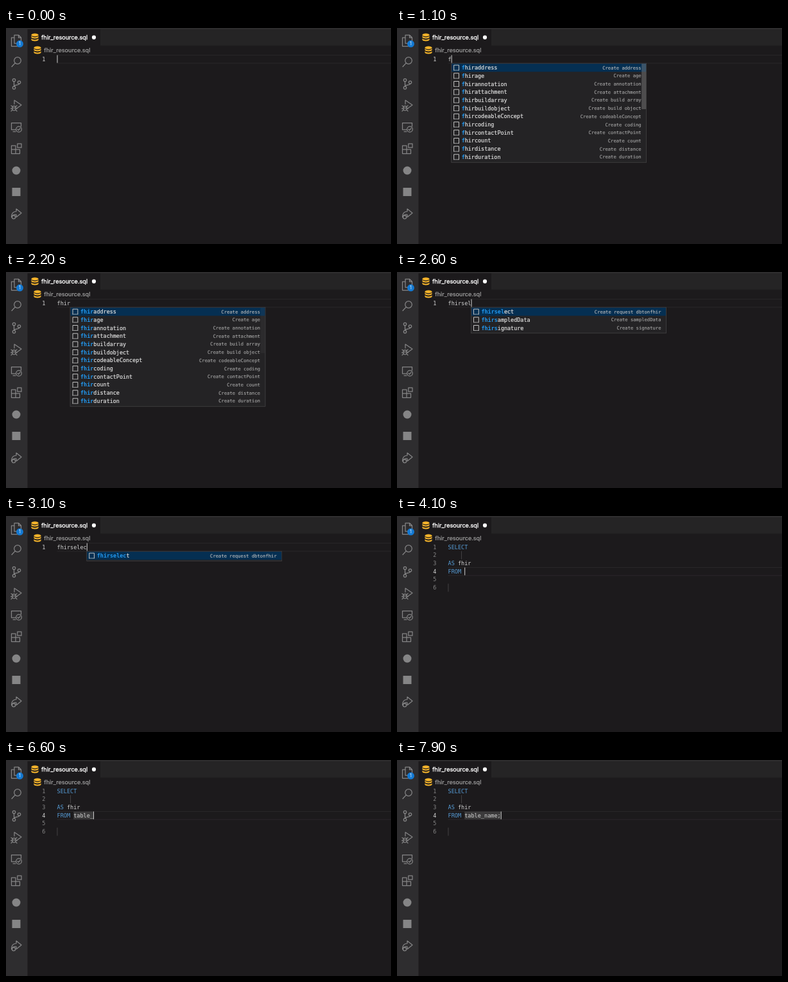
An HTML page that plays this animation: 600x338 px, repeating every 8 s.

```html
<!DOCTYPE html>
<html lang="en">
<head>
<meta charset="utf-8">
<title>SQL snippet typing</title>
<style>
html, body { margin: 0; width: 100%; height: 100%; overflow: hidden; background: #1c1a1c; }
svg { display: block; width: 600px; height: 338px; }
text { white-space: pre; }
.ui { font: 9.12px Inter, sans-serif; }
.code { font: 8.54px "DejaVu Sans Mono", monospace; fill: #d4d4d4; }
.item { font: 8.44px "DejaVu Sans Mono", monospace; fill: #e0e0e0; stroke: #e0e0e0; stroke-width: .2px; }
.note { font: 7.18px "DejaVu Sans Mono", monospace; fill: #a6a6a6; stroke: #a6a6a6; stroke-width: .12px; text-anchor: end; }
.hit { font-weight: bold; fill: #2197ee; stroke: none; }
.kw { fill: #569cd6; }
.num { text-anchor: end; }
.icons { fill: none; stroke: #858586; stroke-width: 1.25; stroke-linejoin: round; stroke-linecap: round; }
</style>
</head>
<body>
<svg viewBox="0 0 600 338">
  <defs>
    <g id="db" fill="#f3b32b">
      <ellipse cy="-3.6" rx="5.6" ry="2.4"/>
      <path id="disc" d="M-5.6-2.2C-4 .6 4 .6 5.6-2.2V-.2C5.6 2.8-5.6 2.8-5.6-.2Z"/>
      <use href="#disc" y="4"/>
    </g>
    <clipPath id="list"><rect x="0" y="55" width="600" height="155"/></clipPath>
  </defs>
  <rect width="600" height="338" fill="#1c1a1c"/>
  <rect width="600" height="27.5" fill="#252425"/>
  <rect width="600" height="2" fill="#2e2d2e"/>
  <rect x="33" y="2" width="114" height="26" fill="#1c1a1c"/>
  <rect width="33.5" height="338" fill="#2e2d2f"/>

  <g class="icons">
    <path d="M13 15V11H19.5L23.5 15V24H13ZM19.5 11V15H23.5M13 15H8.5V28.5H18.5V24"/>
    <circle cx="18" cy="51" r="5.3"/><path d="M14.2 54.8L9 60.5"/>
    <circle cx="12.5" cy="81.5" r="2.2"/><circle cx="12.5" cy="93.5" r="2.2"/>
    <circle cx="20.5" cy="85" r="2.2"/><path d="M12.5 83.7V91.3M20.5 87.2C20.5 90 14 88 12.5 91"/>
    <path d="M13 119V113L24 120.5L17 125.5"/>
    <ellipse cx="12.5" cy="125.5" rx="2.8" ry="3.5"/>
    <path d="M9.7 125H15.3M8 121.5L10.3 123M17 121.5L14.7 123M7.5 126H9.7M15.3 126H17.3M8 130L10.3 128M17 130L14.7 128"/>
    <path d="M15 159H8.5V148.5H23.5V154M11 162H15"/>
    <circle cx="20" cy="158.5" r="4.3"/><path d="M18 158.5L19.5 160L22 157"/>
    <path d="M8.5 184H15V196.5H8.5ZM8.5 190.2H21.5V196.5H15M17.8 181H24V187.2H17.8Z"/>
    <path d="M16 287V283L24 289.5L16 296V292C12 291.5 10 293 8.5 296C8.5 290 11.5 287.2 16 287Z"/>
    <circle cx="12" cy="296" r="2.6" fill="#2e2d2f"/>
  </g>
  <circle cx="16" cy="223" r="6.5" fill="#858586"/>
  <rect x="9.5" y="250" width="13" height="13" fill="#858586"/>
  <circle cx="21.5" cy="24.8" r="5.5" fill="#1479d2"/>
  <text class="ui" x="21.5" y="27.3" text-anchor="middle" fill="#fff" style="font-size:7px">1</text>

  <use href="#db" x="45" y="14.5"/>
  <text class="ui" x="55" y="17.6" fill="#fff" stroke="#fff" stroke-width=".3">fhir_resource.sql</text>
  <circle cx="137" cy="14.7" r="3.1" fill="#fff"/>
  <use href="#db" x="49" y="34.5"/>
  <text class="ui" x="59.3" y="37.8" fill="#a5a5a5" stroke="#a5a5a5" stroke-width=".2">fhir_resource.sql</text>
  <g id="editor"></g>
</svg>
<script>
const LOOP = 8000, LEFT = 79.5, CHAR = 5.14, ROW = 12.7, BLINK = 500;
const editor = document.getElementById('editor');

const all = ['address', 'age', 'annotation', 'attachment', 'build array', 'build object',
  'codeableConcept', 'coding', 'contactPoint', 'count', 'distance', 'duration', 'element']
  .map(s => ['fhir' + s.replace(' ', ''), 'Create ' + s]);
const one = [['fhirselect', 'Create request dbtonfhir']];
const few = [...one, ['fhirsampledData', 'Create sampledData'], ['fhirsignature', 'Create signature']];

// [time of key press, typed length, open list]
const word = 'fhirselect';
const keys = [[-300, 0], [1000, 1], [1300, 2, all], [1500, 3, all], [1700, 4, all],
  [2300, 5, few], [2450, 6, few], [2600, 7, few], [2800, 8, one], [3000, 9, one], [3250, 10, one]];
const EXPAND = 3700;
const table = 'table_name;';
const tableKeys = [4800, 5100, 5400, 5700, 6000, 6400, 6700, 6900, 7100, 7200, 7600];

const rect = (x, y, w, h, fill, more = '') =>
  `<rect x="${x}" y="${y}" width="${w}" height="${h}" fill="${fill}" ${more}/>`;
const text = (cls, x, y, s, more = '') => `<text class="${cls}" x="${x}" y="${y}" ${more}>${s}</text>`;
const lineTop = line => 42.3 + (line - 1) * ROW;
const baseline = line => lineTop(line) + 9.2;

const lineNumber = (line, active) =>
  text('code num', 61.5, baseline(line), line, `style="fill:${active ? '#d0d0d0' : '#858585'}"`);
const currentLine = line =>
  [0, ROW].map(d => rect(LEFT, lineTop(line) + d - .4, 521, .9, '#2b292b')).join('');
const caret = (x, line) => rect(x, lineTop(line) + .2, 1, ROW - .6, '#d0d0d0');
const guide = (x, line) => rect(x, lineTop(line), .9, ROW, '#484648');
const caretOn = (t, since) => Math.floor((t - since) / BLINK) % 2 === 0;

function shared(a, b) {
  let n = 0;
  while (n < a.length && a[n] === b[n]) n++;
  return n;
}

function popup(typed, rows, bar) {
  const x = LEFT + typed.length * CHAR, h = Math.min(155, rows.length * ROW + 2.3);
  let s = rect(x, 55.3, 304, h, '#242325', 'stroke="#434244" stroke-width=".8"');
  s += rect(x + .5, 55.8, 303, ROW, '#052f52');
  s += '<g clip-path="url(#list)">';
  rows.forEach(([name, note], i) => {
    const y = 55.8 + i * ROW, n = shared(name, typed);
    s += `<path d="M${x + 4} ${y + 10.3}V${y + 2.3}H${x + 11.8}V${y + 10.3}" fill="none" stroke="#c4c4c4"/>`;
    s += `<path d="M${x + 3.5} ${y + 10.3}H${x + 12.3}" stroke="#c4c4c4" stroke-dasharray="1.8 .5"/>`;
    s += text('item', x + 16, y + 9.3, `<tspan class="hit">${name.slice(0, n)}</tspan>${name.slice(n)}`);
    s += text('note', x + 296, y + 8.8, note, i ? '' : 'style="fill:#c4c4c4"');
  });
  s += '</g>';
  if (rows === all) s += rect(x + 296.5, 56, 7, 71, '#8c8c8c', `opacity="${bar ? .4 : .08}"`);
  return s;
}

function typing(t) {
  const [at, n, rows] = keys.filter(k => k[0] <= t).pop();
  const typed = word.slice(0, n);
  let s = currentLine(1) + lineNumber(1, true) + text('code', LEFT, baseline(1), typed);
  if (caretOn(t, at)) s += caret(LEFT + n * CHAR, 1);
  // The list opens a moment after the first key
  const open = rows || (t >= 1100 && all);
  return open ? s + popup(typed, open, t < 1700) : s;
}

function snippet(t) {
  const done = tableKeys.filter(k => k <= t), n = done.length, x = LEFT + 5 * CHAR;
  let s = currentLine(4);
  for (let i = 1; i <= 6; i++) s += lineNumber(i, i === 4);
  s += guide(100, 2) + guide(LEFT, 6);
  if (n) s += rect(x, lineTop(4) + .3, n * CHAR, ROW - .6, '#3b3a3b');
  s += text('code', LEFT, baseline(1), '<tspan class="kw">SELECT</tspan>');
  s += text('code', LEFT, baseline(3), '<tspan class="kw">AS</tspan> fhir');
  s += text('code', LEFT, baseline(4), '<tspan class="kw">FROM</tspan> ' + table.slice(0, n));
  return caretOn(t, n ? done[n - 1] : EXPAND) ? s + caret(x + n * CHAR, 4) : s;
}

let shown = '';
function draw(t) {
  const next = t < EXPAND ? typing(t) : snippet(t);
  if (next !== shown) editor.innerHTML = shown = next;
}

const began = performance.now();
function frame(now) {
  draw(Math.max(0, now - began) % LOOP);
  requestAnimationFrame(frame);
}
draw(0);
requestAnimationFrame(frame);
</script>
</body>
</html>
```
